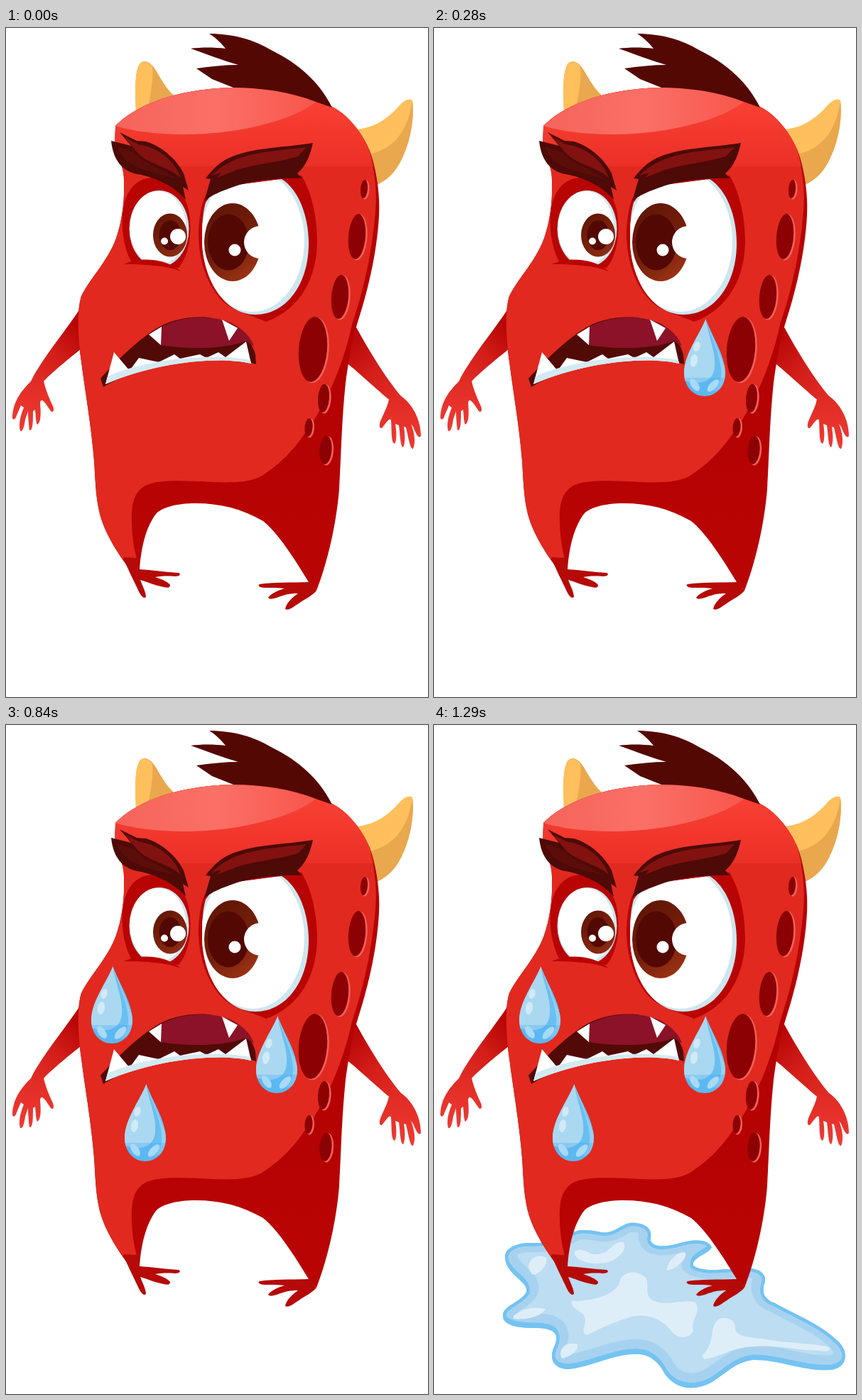
An HTML page with a canvas that plays this animation: 594 px wide and 943 px high, repeating every 1400 ms.

```html
<!DOCTYPE html>
<html lang="en">
<head>
<meta charset="utf-8">
<title>Crying monster</title>
<style>
html, body { margin: 0; width: 100%; height: 100%; overflow: hidden; background: #fff; }
canvas { display: block; width: 594px; height: 943px; }
</style>
</head>
<body>
<canvas id="stage" width="594" height="943"></canvas>
<script>
const ctx = document.getElementById('stage').getContext('2d');
const STEP = 280, STEPS = 5;
const RED = '#e1291f', DARK = '#b90404', BROWN = '#540803';

function shape(d, fill) {
  ctx.fillStyle = fill;
  ctx.fill(new Path2D(d));
}

function oval(x, y, rx, ry, fill, tilt = 0) {
  ctx.fillStyle = fill;
  ctx.beginPath();
  ctx.ellipse(x, y, rx, ry, tilt, 0, Math.PI * 2);
  ctx.fill();
}

function blend(x0, y0, x1, y1, ...colors) {
  const g = ctx.createLinearGradient(x0, y0, x1, y1);
  colors.forEach((c, i) => g.addColorStop(i / (colors.length - 1), c));
  return g;
}

function clipped(d, draw) {
  ctx.save();
  ctx.clip(new Path2D(d));
  draw();
  ctx.restore();
}

function outline(d, color, width) {
  ctx.strokeStyle = color;
  ctx.lineWidth = width;
  ctx.stroke(new Path2D(d));
}

const BODY = `M154 138C180 112 230 87 318 84C365 83 410 92 457 110C480 121 500 145 512 173
  C521 197 527 235 525 265C522 320 508 375 494 418C487 440 482 470 478 500C472 560 472 600 469 650
  C465 700 452 755 437 793L426 781C405 746 382 711 362 695C330 676 295 669 262 670
  C235 671 218 677 211 685C196 705 190 735 188 763L181 772C160 745 140 715 132 685
  C126 660 126 640 124 610C120 560 111 510 106 470C102 440 99 400 106 378
  C120 350 147 325 157 290C165 265 167 235 166 215C166 200 162 190 156 180C152 165 154 150 154 138Z`;

const PUDDLE = `M100 750C100 738 115 730 135 730C160 731 172 727 190 718C202 710 215 711 235 715
  C252 718 262 705 275 702C295 700 308 710 305 722C302 735 320 737 340 732C365 724 385 724 391 736
  C388 745 362 751 365 762C375 770 395 768 415 767L440 766C455 765 468 772 466 785
  C460 800 465 810 480 815C510 832 545 845 570 870C584 885 582 905 560 909
  C520 912 490 895 450 895C425 897 410 915 390 927C365 940 340 936 325 915
  C315 895 300 885 280 887C250 888 220 905 190 908C165 908 162 890 170 875
  C178 855 165 850 140 850C115 850 96 845 97 832C98 818 120 815 130 800C135 785 100 775 100 750Z`;

const DROP = 'M1.5 0C9 22 29 50 29 76C29 96 16 109 0 109C-16 109 -29 96 -29 76C-29 50 -7 22 1.5 0Z';

function puddle() {
  const shine = '#deeef8', rim = '#74c3f2';
  clipped(PUDDLE, () => {
    shape(PUDDLE, rim);
    ctx.save();
    ctx.translate(0, -4);
    clipped(PUDDLE, () => {
      shape(PUDDLE, '#bcddf2');
      outline(PUDDLE, '#a7d2ef', 34);
      outline(PUDDLE, rim, 7);
    });
    ctx.restore();
    outline(PUDDLE, rim, 9);
  });
  shape(`M194 812C225 812 255 803 261 786C264 770 285 766 299 780C303 793 295 805 310 812
    C330 820 350 808 368 814C377 827 360 840 365 854C358 867 342 865 333 853
    C321 836 295 828 275 835C250 843 235 850 216 860C203 857 218 841 211 832C205 825 192 822 194 812Z`, shine);
  shape('M198 742C209 734 216 747 230 746C249 745 251 727 266 729C275 738 258 755 241 758C220 762 196 755 198 742Z', shine);
  shape('M328 765C332 751 347 741 354 744C357 752 341 767 328 769Z', shine);
  shape('M133 766C132 752 146 745 158 751C162 760 146 778 138 774Z', shine);
  shape('M112 833C126 821 142 820 157 823C151 834 130 839 112 837Z', shine);
  shape('M178 887C178 875 190 869 202 873C204 883 190 891 180 893Z', shine);
  shape(`M377 889C399 869 385 847 402 837C416 832 426 842 424 853C430 865 451 862 473 867
    C502 872 535 871 556 877C560 882 552 884 543 882C513 882 484 873 450 876C415 878 401 892 380 894Z`, shine);
}

function horns() {
  const light = '#ffbf5c', shade = '#e9a74e';
  shape('M183 118C182 90 181 65 187 53C190 46 197 45 204 51C214 60 222 85 240 98L210 125Z', shade);
  shape('M183 118C182 90 181 65 187 53C190 46 197 45 206 54C208 75 203 95 198 122Z', light);
  shape('M490 143C520 142 540 125 553 110C560 102 568 98 572 102C575 125 570 160 556 187C548 203 537 214 522 221L505 180Z', light);
  shape('M572 103C575 125 570 160 556 187C548 203 537 214 522 221L512 178C547 170 566 144 572 103Z', shade);
}

function arms() {
  const sleeve = ['#b80706', '#d21d18', '#e02b24'], skin = ['#e02b24', '#ee3a33'];
  shape('M104 396C85 425 60 455 45 480C40 488 37 493 35 499L53 498C65 485 90 465 106 452Z',
    blend(106, 430, 40, 490, ...sleeve));
  shape(`M36 497C25 508 9 525 9 550C11 554 14 550 15 546L21 532L25 535C21 545 17 558 20 568
    C24 570 26 560 27 552L31 540C31 548 32 560 33 567C38 568 38 555 38 540L41 538
    C42 548 42 556 44 559C50 556 49 540 48 528C50 520 55 528 63 540C67 543 68 538 66 533
    C60 520 55 508 53 497Z`, blend(30, 495, 30, 565, ...skin));
  shape('M490 416C505 445 535 495 557 520L538 523C515 503 490 480 478 471Z',
    blend(482, 440, 550, 520, ...sleeve));
  shape(`M556 519C570 528 584 550 584 575C581 580 577 572 573 562L570 558C575 570 577 585 573 593
    C569 594 567 580 563 563L560 562C562 575 562 586 559 591C555 590 555 575 553 560L548 558
    C550 570 550 582 547 586C542 584 543 570 542 553C540 548 535 557 529 564C525 565 525 558 528 552
    C533 540 538 532 539 522Z`, blend(560, 520, 560, 590, ...skin));
}

function feet() {
  shape(`M165 746L184 747L188 763C205 764 225 767 243 768C247 770 244 773 238 773C225 772 215 773 210 774
    C220 777 228 781 231 785C231 790 226 789 222 788C210 786 200 781 189 778C193 788 197 796 197 802
    C193 806 188 797 185 790C178 775 170 760 165 746Z`, '#b50a08');
  shape(`M427 781C400 782 375 781 357 784C353 786 358 789 364 789C375 789 385 789 392 790
    C382 793 372 798 369 803C372 807 380 803 390 800C398 797 406 797 411 797C402 803 394 812 393 819
    C398 822 406 815 415 809C425 803 432 799 437 793Z`, '#b50a08');
}

function body() {
  shape(BODY, blend(0, 600, 0, 700, '#b50202', DARK));
  clipped(BODY, () => {
    shape(`M80 60H470L512 174C522 215 522 240 519 270C513 330 500 380 487 418C477 465 455 525 421 571
      C401 600 385 614 365 628C348 641 320 641 290 640C250 638 215 636 196 645C180 655 176 670 177 700
      C178 725 182 740 184 748H80Z`, RED);
    shape('M140 70H470L512 174L517 195H140Z', blend(0, 95, 0, 195, '#fb4235', '#ea3027'));
    shape('M154 138C205 154 300 155 370 134C400 126 420 116 438 103L400 70H140Z',
      blend(155, 0, 436, 0, '#f5645a', '#fa7067', '#f8564b'));
  });
}

function spots() {
  const list = [[504, 227, 5, 13], [494, 294, 12, 32], [470, 379, 12, 31], [432, 453, 20, 46],
    [447, 522, 8, 20], [426, 563, 5.5, 13], [450, 595, 8.5, 20]];
  for (const [x, y, rx, ry] of list) {
    oval(x + 2, y + 1, rx + 0.5, ry + 0.5, '#f4605a', 0.08);
    oval(x, y, rx, ry, '#8c0103', 0.08);
  }
}

function hair() {
  shape(`M286 8C320 8 350 17 373 31C412 50 441 76 459 112L436 104C400 90 360 84 320 84L290 72
    C283 67 275 62 268 57C288 54 308 52 327 52C308 47 280 36 260 29C275 27 292 27 309 29
    C302 20 293 12 286 8Z`, BROWN);
}

function leftEye() {
  shape(`M178 332C164 310 160 270 167 245C175 220 190 211 208 211C235 215 255 235 258 262
    C263 295 255 325 243 338Z`, DARK);
  clipped('M165 200H270V340H241C225 329 203 326 186 328L165 325Z', () => {
    oval(215.5, 283, 42, 54, '#cde6ef');
    oval(214, 282, 39.5, 52, '#fff');
    oval(231, 292, 24, 30.5, blend(212, 272, 248, 312, '#641706', '#8c2a12'));
    oval(231, 292, 15.5, 21, BROWN);
    oval(242, 294, 11, 11, '#fff');
    oval(223, 300.5, 5, 5, '#fff');
  });
  shape('M166 333C190 322 226 325 246 343C225 334 195 333 166 333Z', DARK);
}

function rightEye() {
  const white = `M281 246L296 225L388 213C412 228 426 265 426 304C426 360 395 404 351 404
    C305 404 276 350 276 298C276 275 277 260 281 246Z`;
  shape(`M366 414C350 406 320 400 305 385C280 360 270 320 271 285C272 265 275 250 280 238L330 205L416 208
    C432 235 438 270 438 303C436 365 405 400 366 414Z`, DARK);
  shape(white, '#cde6ef');
  clipped(white, () => {
    oval(347, 300, 73, 100, '#fff');
    oval(319, 302, 40, 55, blend(290, 270, 350, 345, '#641706', '#741f0b', '#9c3315'));
    oval(313, 302, 29, 39.5, BROWN);
    oval(358, 302, 23, 23, '#fff');
    oval(322, 313, 8.5, 8.5, '#fff');
  });
}

function brows() {
  const base = '#4d0a07', glow = '#82120f';
  shape(`M148 159L176 166L160 147L184 159L197 160C220 167 240 185 250 205L257 229L249 224L253 242
    C237 223 210 210 185 206C165 202 151 188 148 159Z`, base);
  shape('M167 154L186 164C214 168 237 186 246 211C228 195 202 193 186 177Z', glow);
  shape('M156 167L181 176C195 191 219 198 240 213C212 202 169 203 156 167Z', '#5c0d0a');
  shape(`M279 244L288 213L281 212C290 200 300 190 312 184C345 168 390 169 432 162
    C428 180 422 195 410 205L417 212C385 211 345 215 320 224C303 230 290 235 279 244Z`, base);
  shape('M289 208C300 197 315 188 330 183C355 174 390 172 423 168L411 181C380 190 350 192 325 200L297 211L303 204Z', glow);
}

function mouth() {
  shape(`M133 494C150 475 180 445 205 428C230 410 260 406 285 408C315 412 345 435 351 460L352 474
    C320 464 270 464 225 473C190 480 160 492 137 506Z`, '#520a07');
  shape('M218 447L212 425C245 404 290 404 318 416C335 425 346 438 349 449L338 441C310 452 260 454 218 447Z', '#8b1228');
  shape('M201 432L219 421L218 447Z', '#fff');
  shape('M304 411L326 423L314 441Z', '#fff');
  shape(`M140 502L152 457L174 483L187 465L215 471L237 460L245 466L273 460L282 465L299 457L309 464
    L338 442L345 473C300 462 210 471 140 502Z`, '#fff');
  shape('M140 502L143 491C200 466 290 458 344 468L345 473C300 462 210 471 140 502Z', '#d2eaf1');
}

function tear(x, y) {
  ctx.save();
  ctx.translate(x, y);
  clipped(DROP, () => {
    shape(DROP, '#69bff0');
    shape('M1.5 0C5 25 16 46 14 68C12 87 -3 95 -29 87V40Z', '#aad8f1');
    shape('M1.5 0C10 28 21 48 23 72C24 83 21 94 13 102C27 99 32 87 30 72Z', '#91d1f5');
    ctx.globalAlpha = 0.3;
    ctx.fillStyle = '#40a6ef';
    ctx.fillRect(-30, 83, 60, 28);
    ctx.globalAlpha = 1;
    oval(-15, 59, 5, 9, '#d0eaf8', 0.18);
    oval(-11, 39, 4.5, 7, '#d0eaf8', 0.3);
    oval(-14, 93, 5, 10, '#a8daf8', -0.6);
    oval(12, 94, 5, 11, '#a8daf8', 0.75);
  });
  ctx.restore();
}

function monster() {
  horns();
  arms();
  body();
  feet();
  spots();
  hair();
  leftEye();
  rightEye();
  brows();
  mouth();
}

const TEARS = [[381, 410], [149, 340], [196, 506]];

function frame() {
  const step = Math.floor(performance.now() / STEP) % STEPS;
  ctx.fillStyle = '#fff';
  ctx.fillRect(0, 0, 594, 943);
  if (step === 4) puddle();
  monster();
  TEARS.slice(0, step).forEach(([x, y]) => tear(x, y));
  requestAnimationFrame(frame);
}

frame();
</script>
</body>
</html>
```
